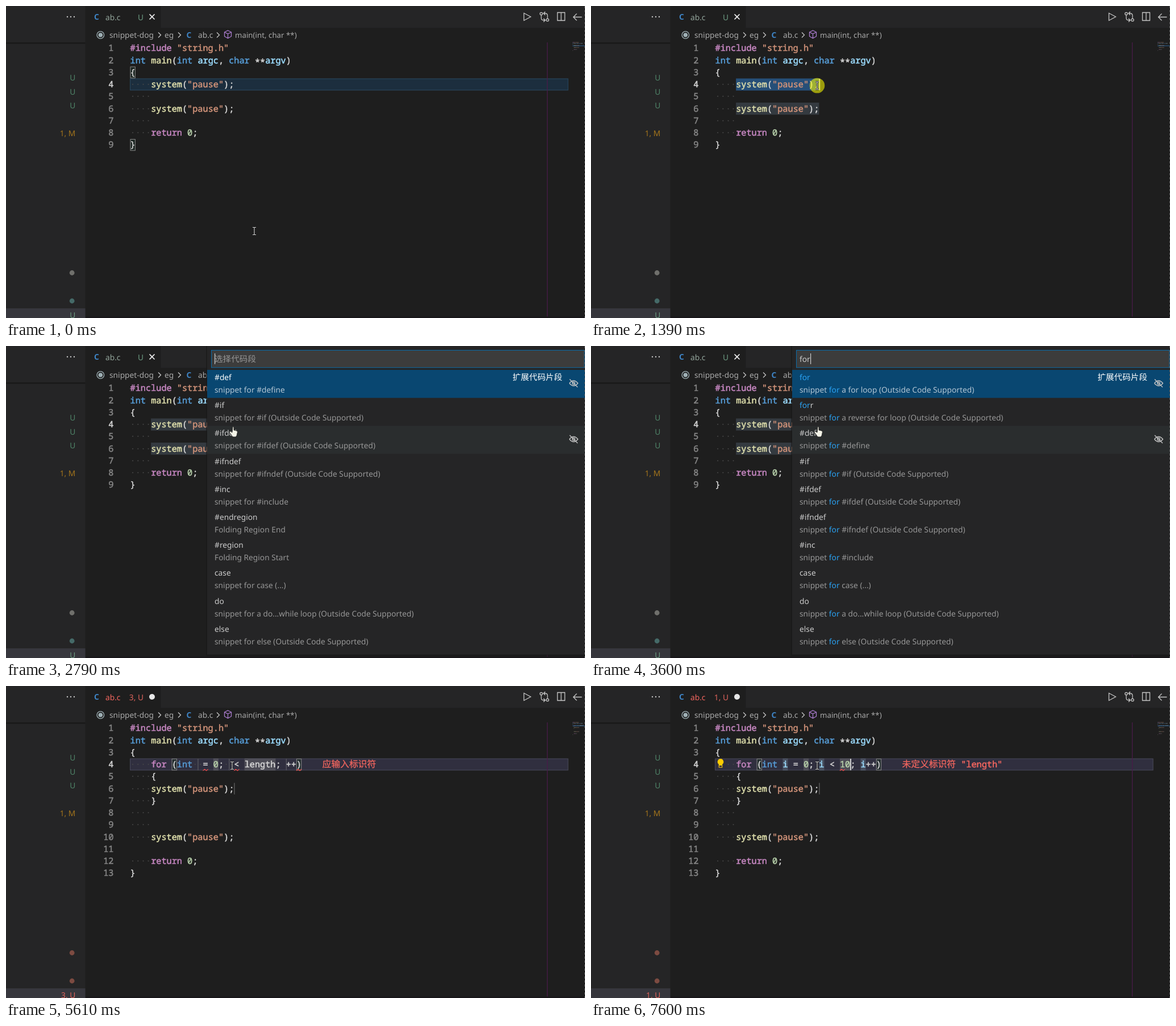
Animation of 1019 by 549 pixels, one loop 8000 ms. Source, as an HTML page:

```html
<!DOCTYPE html>
<html lang="zh">
<head>
<meta charset="utf-8">
<title>Snippet picker</title>
<style>
  html, body { margin: 0; width: 100%; height: 100%; overflow: hidden; background: #1e1e1e; }
  svg { display: block; }
  text { white-space: pre; text-rendering: geometricPrecision; font: 13.75px "Noto Sans", "Noto Sans CJK SC", "Noto Sans CJK", sans-serif; }
  .code { font: 15.23px "Noto Sans Mono", "DejaVu Sans Mono", monospace; stroke-width: .55; }
  .cjk { font: 14.6px "Noto Sans CJK SC", "Noto Sans CJK", sans-serif; }
  .msg { font-size: 15.75px; stroke-width: .3; }
  .icon { fill: none; stroke: #c5c5c5; stroke-width: 1.3; }
</style>
</head>
<body>
<svg id="stage" width="1019" height="549" viewBox="0 0 1019 549"></svg>
<script>
const LOOP = 8000, X0 = 218.6, CW = 9.138, TOP = 63.75, LH = 21.25;
const RED = '#f4665f';
const stage = document.getElementById('stage');

// Each step changes part of the state and keeps the rest.
const steps = [
  [0, { mouse: [437, 396], cursor: 'beam', body: 'a', line: 'blue', brackets: 1, v: '', n: 'length', errors: 0 }],
  [200, { mouse: [412, 338] }],
  [400, { mouse: [350, 247] }],
  [600, { mouse: [290, 172] }],
  [800, { mouse: [262, 146] }],
  [1000, { mouse: [256, 140] }],
  [1190, { press: 1, blink: 1, at: 4 }],
  [1390, { mouse: [398, 140], line: '', brackets: 0, picked: '#264f78', at: 20 }],
  [1980, { press: 0 }],
  [2380, { picked: '#343a40', blink: 0 }],
  [2790, { query: '', cursor: 'hand' }],
  [3000, { query: 'f' }],
  [3400, { query: 'fo' }],
  [3600, { query: 'for' }],
  [4200, { query: null, cursor: 'beam', body: 'b', picked: '', line: 'blue', field: 'v', blink: 1 }],
  [4410, { brackets: 1 }],
  [4610, { blink: 0 }],
  [4810, { errors: 3, line: 'violet' }],
  [5220, { blink: 1 }],
  [5610, { blink: 0 }],
  [6000, { v: 'i', blink: 1 }],
  [6400, { field: 'zero', line: 'red', brackets: 0 }],
  [6600, { field: 'n' }],
  [6800, { errors: 1 }],
  [7000, { bulb: 1 }],
  [7400, { n: '1', field: 'end', line: 'violet', brackets: 1 }],
  [7600, { n: '10' }]
];
let last = { query: null };
const states = steps.map(([at, change]) => ({ at, state: last = { ...last, ...change } }));

const lineFill = { blue: ['#1c2e3e', '#2a4a62'], violet: ['#302f3f', '#4b4b5c'], red: ['#362122', '#362122'] };
const colours = {
  '#include': '#c586c0', for: '#c586c0', return: '#c586c0', int: '#569cd6', char: '#569cd6',
  main: '#dcdcaa', system: '#dcdcaa', argc: '#9cdcfe', argv: '#9cdcfe', i: '#9cdcfe'
};
const tint = w => colours[w] || (w[0] === '"' ? '#ce9178' : /^\d/.test(w) ? '#b5cea8' : '#d4d4d4');

const esc = s => s.replace(/&/g, '&amp;').replace(/</g, '&lt;');
const rect = (x, y, w, h, fill, more = '') => `<rect x="${x}" y="${y}" width="${w}" height="${h}" fill="${fill}" ${more}/>`;
const dot = (x, y, r, fill, more = '') => `<circle cx="${x}" cy="${y}" r="${r}" fill="${fill}" ${more}/>`;
const text = (x, y, s, fill, more = '') => `<text x="${x}" y="${y}" fill="${fill}" ${more}>${s}</text>`;
const path = (d, more = 'class="icon"') => `<path d="${d}" ${more}/>`;
const colX = c => X0 + c * CW;
const lineY = n => TOP + (n - 1) * LH;
const cell = (n, c, len, fill, more) => rect(colX(c), lineY(n), len * CW, LH, fill, more);
const caret = (n, c, fill = '#e0e0e0', w = 1.8) => rect(colX(c), lineY(n) + .5, w, LH - 1, fill);
const tokens = s => s.match(/"[^"]*"|#include|\w+|\s+|[^\w"#\s]+/g) || [];

function squiggle(c, len) {
  let d = `M${colX(c)} 149`;
  for (let i = 0; i < len * 3; i++) d += `l${CW / 3} ${i % 2 ? 2.6 : -2.6}`;
  return path(d, 'fill="none" stroke="#f14c4c" stroke-width="1.1"');
}

// Columns of the snippet fields in the loop header.
function fields({ v, n }) {
  const zero = 16 + v.length, v2 = zero + 3, len = v2 + v.length + 3, v3 = len + n.length + 2;
  return { v1: 13, zero, v2, len, v3, close: v3 + v.length + 2 };
}

function source({ body, v, n }) {
  const head = ['#include "string.h"', 'int main(int argc, char **argv)', '{'];
  const call = '    system("pause");', gap = '    ', tail = ['    return 0;', '}'];
  return body === 'a'
    ? [...head, call, gap, call, gap, ...tail]
    : [...head, `    for (int ${v} = 0; ${v} < ${n}; ${v}++)`, '    {', call, '    }', gap, gap, call, '', ...tail];
}

function codeLine(s, n, bulb) {
  const y = lineY(n) + 15.6;
  let c = 0, out = '';
  for (const tok of tokens(s)) {
    const drop = tok[0] === '*' ? 3 : 0;
    if (tok.trim()) out += `<tspan x="${colX(c)}" y="${y + drop}" fill="${tint(tok)}" stroke="${tint(tok)}">${esc(tok)}</tspan>`;
    else if (tok.length > 1) for (let k = bulb && !c ? 2 : 0; k < tok.length; k++)
      out += `<tspan x="${colX(c + k)}" fill="#484848">·</tspan>`;
    c += tok.length;
  }
  const shade = n === 4 ? '#d0d0d0' : '#858585';
  return text(0, y, out, '#d4d4d4', 'class="code"') +
    text(189.5, y, n, shade, `class="code" text-anchor="end" stroke="${shade}"`);
}

function minimap(lines, s) {
  let out = s.line || s.picked ? rect(997, 69, 22, 2, s.line === 'red' ? '#3c2a2c' : '#24405a') : '';
  lines.forEach((l, n) => {
    let c = 0;
    for (const tok of tokens(l)) {
      if (tok.trim()) out += rect(997 + c * .58, 63.5 + n * 1.8, tok.length * .58, 1, tint(tok), 'opacity=".4"');
      c += tok.length;
    }
  });
  return out;
}

function bulb() {
  return path('M228 128a5.5 5.5 0 0 0-3.2 9.8V140h6.4v-2.2A5.5 5.5 0 0 0 228 128z', 'fill="#ffcc00"') +
    path('M225.3 140v3.2h5.4V140', 'fill="none" stroke="#d9ae18" stroke-width="1.3"');
}

function editor(s) {
  const lines = source(s), f = fields(s), loop = s.body === 'b';
  let out = '';
  if (s.line) {
    const [fill, edge] = lineFill[s.line];
    out += rect(X0, 128, 770.5, 20, fill, `stroke="${edge}"`);
  }
  if (s.picked) out += cell(4, 4, 16, s.picked) + cell(6, 4, 16, '#343a40');
  if (loop) {
    const grey = '#7c7c7c', faint = 'opacity=".38"';
    [f.v1, f.v2, f.v3].forEach(c => out += s.v ? cell(4, c, 1, '#6d8290', faint) : caret(4, c, '#5c5c62', 1.2));
    out += cell(4, f.zero, 1, grey, faint) + cell(4, f.len, s.n.length, grey, faint);
    if (s.field === 'zero') out += cell(4, f.zero, 1, '#50647f');
    if (s.field === 'n') out += cell(4, f.len, s.n.length, '#50647f');
    out += caret(6, 20, '#666', 1.2);
  }
  if (s.brackets) {
    const pairs = loop ? [[4, 8], [4, f.close]] : [[3, 0], [9, 0]];
    pairs.forEach(([n, c]) => out += rect(colX(c) + .4, lineY(n) + .8, CW - .8, LH - 1.6, '#1c2c25', 'stroke="#888" fill-opacity=".6"'));
  }
  lines.forEach((l, n) => out += codeLine(l, n + 1, s.bulb && n === 3));

  if (s.errors) {
    const undef = s.errors === 1, x = colX(f.close + 5);
    out += text(x, 143.4, undef ? '未定义标识符' : '应输入标识符', RED, `class="cjk msg" stroke="${RED}"`);
    if (undef) out += text(x + 103.6, 143.4, '"length"', RED, `class="code" stroke="${RED}"`) + squiggle(f.len, s.n === 'length' ? 6 : 1);
    else [f.v1 + s.v.length + 1, f.v2 + s.v.length + 1, f.close].forEach(c => out += squiggle(c, 1));
  }
  if (s.blink) {
    const w = s.v.length;
    const at = !loop ? [s.at] : { v: [f.v1 + w, f.v2 + w, f.v3 + w], zero: [f.zero + 1] }[s.field] || [f.len + s.n.length];
    at.forEach(c => out += caret(4, c));
  }
  if (s.bulb) out += bulb();
  return out + rect(952, 64, 1.2, 485, '#4a1a4a') + minimap(lines, s);
}

const chevron = x => path(`M${x} 46.5l4.5 4.5-4.5 4.5`);
const letterC = (x, y) => text(x, y, 'C', '#3f86c8', 'style="font-weight:700"');

function chrome(s) {
  const bad = s.errors > 0, dirty = s.body === 'b';
  const tag = bad ? `${s.errors}, U` : 'U', name = bad ? RED : '#93a59b', flag = bad ? '#e0645c' : '#6c9b82';
  let out = rect(140, 0, 879, 38.5, '#252526') + rect(140, 0, 132.5, 39, '#1e1e1e');
  out += letterC(155, 24) + text(175, 24.5, 'ab.c', name) + text(242, 24.5, tag, flag, 'text-anchor="end"');
  out += dirty ? dot(257, 19, 5, '#e8e8e8') : path('M252.5 14.5l9 9m0-9l-9 9', 'stroke="#f0f0f0" stroke-width="1.6"');

  out += path('M911.5 12.5v13l12-6.5z') + path('M970.5 11.5h13v14h-13zM977 11.5v14') +
    path('M1013.5 19.5h-15m6-6l-6 6 6 6') +
    path('M942 16v5q0 4 4 4h3m-3-3l3 3-3 3M953 22v-5q0-4-4-4h-3m3-3l-3 3 3 3') +
    dot(942, 13.5, 2.2, 'none', 'class="icon"') + dot(953, 24.5, 2.2, 'none', 'class="icon"');

  out += dot(166.3, 51, 6.3, 'none', 'stroke="#9fb0b5" stroke-width="1.3"') + dot(166.3, 51, 3.8, '#9fb0b5');
  out += text(182, 56, 'snippet-dog', '#a9a9a9') + chevron(268) + text(279, 56, 'eg', '#a9a9a9') + chevron(303) +
    letterC(317.5, 56) + text(338, 56, 'ab.c', '#a9a9a9') + chevron(371) + text(403, 56, 'main(int, char **)', '#a9a9a9', 'style="font-size:13.3px"');
  out += path('M390.5 43l6 3v7.5l-6 3.3-6-3.3V46zM384.5 46l6 3 6-3M390.5 49v7.5', 'fill="none" stroke="#b180d7" stroke-width="1.2"');

  out += rect(0, 0, 139.5, 549, '#252526') + rect(0, 64, 139.5, 2.5, '#191919') + rect(0, 532, 139.5, 17, '#37373d');
  [108, 114, 120].forEach(x => out += dot(x, 19, 1.2, '#c5c5c5'));
  const side = (y, t, fill) => text(122.3, y, t, fill, 'text-anchor="end"');
  [130.5, 155.5, 180].forEach(y => out += side(y, 'U', '#4f8468'));
  out += side(229, '1, M', '#a3741c') + side(549.3, tag, flag);
  out += dot(116.2, 469.5, 4.4, bad ? '#7d4b41' : '#70706c') + dot(116.2, 519, 4.4, bad ? '#7d4b41' : '#456a68');
  return out + rect(140, 546.5, 879, 2.5, '#181619');
}

const out = ' (Outside Code Supported)';
const snippets = [
  ['#def', 'snippet for #define'], ['#if', 'snippet for #if' + out], ['#ifdef', 'snippet for #ifdef' + out],
  ['#ifndef', 'snippet for #ifndef' + out], ['#inc', 'snippet for #include'], ['#endregion', 'Folding Region End'],
  ['#region', 'Folding Region Start'], ['case', 'snippet for case (...)'],
  ['do', 'snippet for a do...while loop' + out], ['else', 'snippet for else' + out],
  ['else if', 'snippet for else if' + out], ['enum', 'snippet for enum'],
  ['for', 'snippet for a for loop' + out], ['forr', 'snippet for a reverse for loop' + out]
];

function mark(s, q) {
  const k = q ? s.toLowerCase().indexOf(q) : -1;
  return k < 0 ? s : `${s.slice(0, k)}<tspan fill="#2aa3f5">${s.slice(k, k + q.length)}</tspan>${s.slice(k + q.length)}`;
}

const eyeOff = y => path(`M991.5 ${y}q7.5-9 15 0q-7.5 9-15 0M992 ${y - 7}l14 14`) + dot(999, y, 2.3, 'none', 'class="icon"');

function picker(q) {
  const hits = snippets.filter(r => r.join(' ').toLowerCase().includes(q));
  if (q) hits.sort((a, b) => b[0].startsWith(q) - a[0].startsWith(q));
  let g = rect(352, 0, 667, 545.5, '#181818', 'opacity=".6"') + rect(354, 0, 665, 543, '#252526') +
    rect(361.5, 7.5, 656.5, 30.5, '#3c3c3c', 'stroke="#0a6ca8"');
  g += q ? text(367, 27.5, q, '#ccc') : text(367, 28, '选择代码段', '#969696', 'class="cjk"');
  g += rect(367 + [0, 5, 13, 19][q.length], 13, 1.2, 19, '#ccc');
  g += rect(354, 42, 665, 49.3, '#094771') + rect(354, 140.5, 665, 49.2, '#2a2d2e');
  hits.slice(0, 10).forEach(([label, detail], k) => {
    const y = 42 + k * 49.2;
    g += text(367, y + 18, mark(label, q), k ? '#ccc' : '#fff') +
      text(367, y + 40, mark(detail, q), k ? '#979797' : '#b4c6d4');
  });
  return g + text(979, 60.3, '扩展代码片段', '#fff', 'class="cjk" text-anchor="end"') + eyeOff(65.5) + eyeOff(164);
}

function pointer({ mouse: [x, y], cursor, press }) {
  let g = press ? dot(x, y, 13.3, '#ff0', 'opacity=".56"') : '';
  if (cursor === 'beam') {
    const d = `M${x - 3} ${y - 6.5}h2.2l.8 .8 .8-.8h2.2M${x} ${y - 6}v12M${x - 3} ${y + 6.5}h2.2l.8-.8 .8 .8h2.2`;
    return g + path(d, 'fill="none" stroke="#111" stroke-width="2.6"') + path(d, 'fill="none" stroke="#ddd" stroke-width="1.1"');
  }
  const d = `M${x + 1} ${y + 2}q1.6-1 2 1v5l5 1.2q1.6 .6 1.4 2.4l-1 5q-.4 3-2.6 3.4h-4q-1.6-.4-2.6-2.4l-4-6q0-2 2-1.4l2.8 2z`;
  return g + path(d, 'fill="#f4f4e8" stroke="#222" stroke-width=".9"');
}

function draw(s) {
  stage.innerHTML = editor(s) + chrome(s) + (s.query === null ? '' : picker(s.query)) +
    path('M1018.5 0V549', 'stroke="#5c5c5c" stroke-dasharray="4 3"') + pointer(s);
}

let shown;
function tick() {
  const t = performance.now() % LOOP;
  const now = states.filter(e => e.at <= t).pop().state;
  if (now !== shown) draw(shown = now);
  requestAnimationFrame(tick);
}
tick();
</script>
</body>
</html>
```
